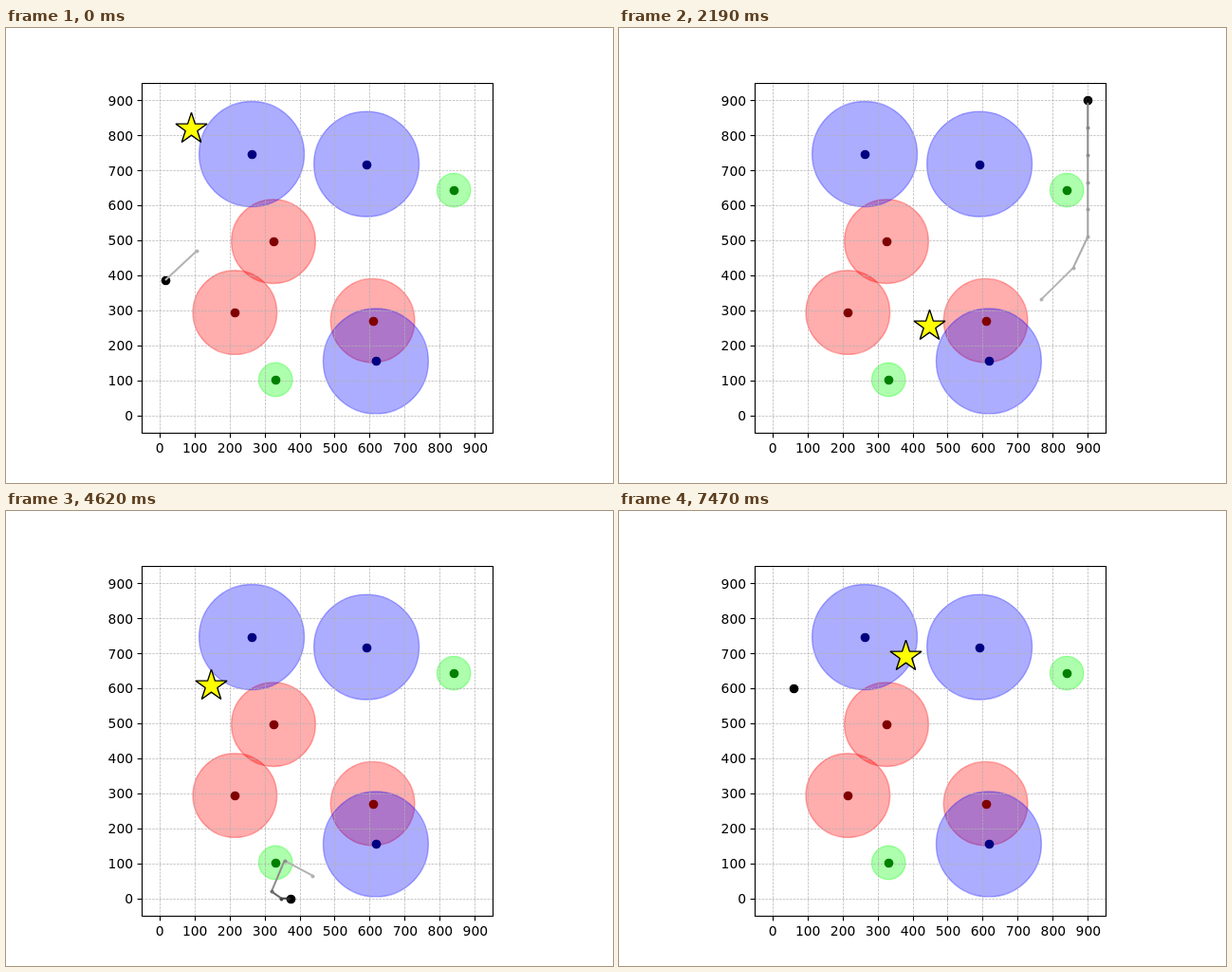
These frames come from a looping animation (640 by 480 pixels, 7.5 s). An HTML page with a canvas:

```html
<!DOCTYPE html>
<html lang="en">
<head>
<meta charset="utf-8">
<title>Agent runs</title>
<style>
html, body { margin: 0; width: 100%; height: 100%; overflow: hidden; background: #fff; }
canvas { display: block; }
</style>
</head>
<body>
<canvas id="stage" width="640" height="480"></canvas>
<script>
const ctx = document.getElementById('stage').getContext('2d');
const STEP_MS = 30, STEPS = 250, RUN = 50, PACE = 92;
const px = x => 161.68 + x * 0.3696;
const py = y => 408.72 - y * 0.3696;
const snap = v => Math.floor(v + 0.5) + 0.5;

const zones = [
  { rgb: '255,0,0', dot: '#800000', r: 120, at: [[325.5, 496.5], [215.5, 294], [608.5, 270.5]] },
  { rgb: '0,0,255', dot: '#000080', r: 150, at: [[263.5, 746], [591, 717.5], [617.5, 155]] },
  { rgb: '0,255,0', dot: '#008000', r: 48, at: [[840, 643], [331.5, 102]] }
];

// Turning points only; the steps between them and the final settling are computed.
const bay = [[0, 212], [36, 123], [112, 50], [203, 47], [283, 80], [358, 85], [364, 23], [385, 0]];
const runs = [
  { star: [91, 820], rest: 396, turns: [[107, 470], [17, 386], ...bay] },
  { star: [446, 257.5], rest: 900, turns: [[767, 331], [858, 421], [900, 510], [900, 900]] },
  { star: [72.5, 357.5], rest: 396, turns: [[100, 663], [8, 573], [0, 483], ...bay] },
  { star: [147.5, 608], rest: 386, turns: [[437, 65], [357, 108], [320, 20], [348, 0]] },
  { star: [400, 708], rest: 366, turns: [[105, 97], [173, 79], [311, 96], [328, 8], [350, 0]] },
  { star: [380.5, 693], rest: 60, turns: [[60, 600]] }
];

// Splits each leg into equal steps no longer than PACE, then slides sideways to rest.
function walk({ turns, rest }) {
  const path = [turns[0]];
  for (const [x, y] of turns.slice(1)) {
    const [x0, y0] = path[path.length - 1];
    const n = Math.ceil(Math.max(Math.abs(x - x0), Math.abs(y - y0)) / PACE);
    for (let i = 1; i <= n; i++) path.push([x0 + (x - x0) * i / n, y0 + (y - y0) * i / n]);
  }
  while (path.length < RUN) {
    const [x, y] = path[path.length - 1];
    path.push([x + (rest - x) * 0.45, y]);
  }
  return path;
}
for (const run of runs) run.path = walk(run);

function line(x1, y1, x2, y2) {
  ctx.beginPath();
  ctx.moveTo(x1, y1);
  ctx.lineTo(x2, y2);
  ctx.stroke();
}

function disc(x, y, r, fill) {
  ctx.beginPath();
  ctx.arc(x, y, r, 0, 2 * Math.PI);
  ctx.fillStyle = fill;
  ctx.fill();
}

const marker = ([x, y], r, fill) => disc(snap(px(x)), snap(py(y)), r, fill);

function drawZones() {
  ctx.lineWidth = 1.39;
  for (const { rgb, r, at } of zones) {
    const tint = ctx.strokeStyle = `rgba(${rgb},.32)`;
    for (const [x, y] of at) {
      disc(px(x), py(y), r * 0.3696, tint);
      ctx.stroke();
    }
  }
}

function drawGrid() {
  ctx.strokeStyle = '#b0b0b0';
  ctx.lineWidth = 0.69;
  ctx.setLineDash([2.57, 1.11]);
  for (let v = 0; v <= 900; v += 100) {
    line(snap(px(v)), 427.2, snap(px(v)), 57.6);
    line(143.2, snap(py(v)), 512.8, snap(py(v)));
  }
  ctx.setLineDash([]);
}

function drawAxes() {
  ctx.strokeStyle = ctx.fillStyle = '#000';
  ctx.lineWidth = 1.11;
  ctx.strokeRect(143.5, 58.5, 370, 369);
  ctx.font = '13.89px "DejaVu Sans", sans-serif';
  for (let v = 0; v <= 900; v += 100) {
    line(snap(px(v)), 427.5, snap(px(v)), 432.4);
    line(138.6, snap(py(v)), 143.5, snap(py(v)));
    ctx.textAlign = 'center';
    ctx.fillText(v, px(v) + 0.5, 448);
    ctx.textAlign = 'right';
    ctx.fillText(v, 134.1, Math.round(py(v) + 5.51));
  }
}

function drawTrail(path, n) {
  marker(path[n], 4.86, '#000');
  ctx.lineWidth = 2.08;
  for (let i = 0; i < n; i++) {
    const grey = Math.round(178.5 * (1 - i / n));
    const [[x1, y1], [x2, y2]] = path.slice(i, i + 2);
    const color = ctx.strokeStyle = `rgb(${grey},${grey},${grey})`;
    line(px(x1), py(y1), px(x2), py(y2));
    marker(path[i], 2, color);
  }
}

function drawStar([x, y]) {
  ctx.beginPath();
  for (let i = 0; i < 10; i++) {
    const r = i % 2 ? 6.63 : 17.36, a = i * Math.PI / 5;
    ctx.lineTo(snap(px(x)) + r * Math.sin(a), snap(py(y)) - r * Math.cos(a));
  }
  ctx.closePath();
  ctx.fillStyle = '#ff0';
  ctx.fill();
  ctx.strokeStyle = '#000';
  ctx.lineWidth = 1.39;
  ctx.lineJoin = 'bevel';
  ctx.stroke();
  ctx.lineJoin = 'miter';
}

const start = performance.now();

function draw(now) {
  const k = Math.floor(Math.max(0, now - start) / STEP_MS) % STEPS + 1;
  const { star, path } = runs[Math.floor(k / RUN)];
  ctx.fillStyle = '#fff';
  ctx.fillRect(0, 0, 640, 480);
  drawZones();
  drawGrid();
  for (const { dot, at } of zones) at.forEach(p => marker(p, 4.86, dot));
  drawTrail(path, k % RUN);
  drawStar(star);
  drawAxes();
  requestAnimationFrame(draw);
}
draw(start);
</script>
</body>
</html>
```
